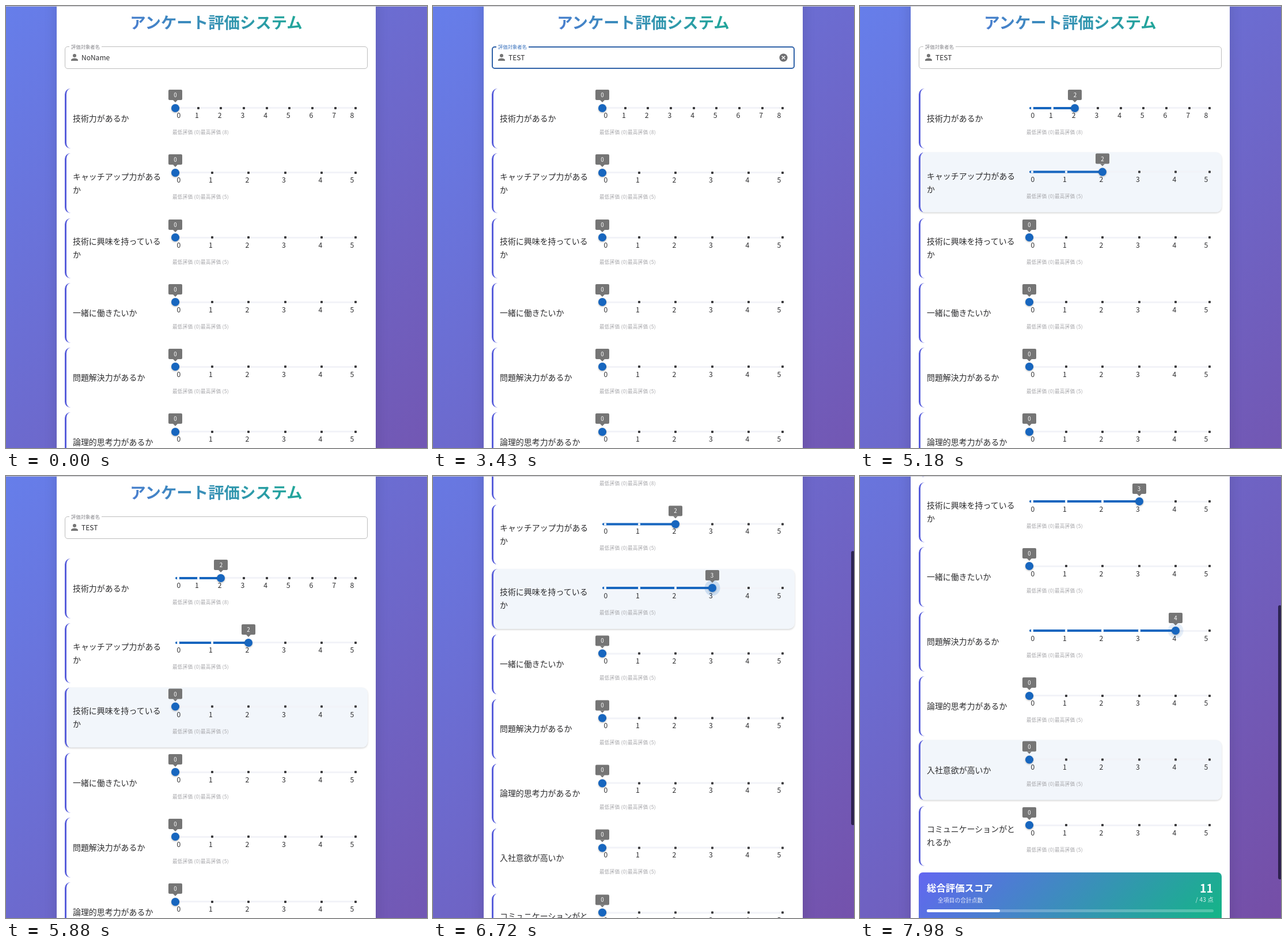
Write an HTML page that moves like this. It is 731 px wide and 766 px high and loops after 8 s.

```html
<!DOCTYPE html>
<html lang="ja">
<head>
<meta charset="utf-8">
<title>アンケート評価システム</title>
<style>
html, body { margin: 0; width: 100%; height: 100%; overflow: hidden; }
body {
  font-family: "Noto Sans CJK JP", "Noto Sans CJK", "Noto Sans", sans-serif;
  color: #2c2c2e;
}
.stage { position: relative; width: 731px; height: 766px; overflow: hidden; }
.stage div, .stage span, .stage svg { position: absolute; box-sizing: border-box; white-space: pre; }
.page {
  left: 0; top: 0; width: 731px; height: 1235px;
  background: linear-gradient(135deg, #667eea, #764ba2);
}
.panel {
  left: 88px; top: -30px; width: 554px; height: 1265px;
  background: #fff; box-shadow: 0 6px 22px rgba(0, 0, 0, .12);
}
.edge { left: 0; top: 0; width: 731px; height: 1px; background: #c7c7cd; }
.title {
  left: 102px; top: 7px; width: 526px; height: 40px;
  font: 700 27.4px/40px "Noto Sans CJK JP", "Noto Sans CJK", sans-serif; text-align: center;
  background: linear-gradient(45deg, #5a6ce6, #10b981);
  -webkit-background-clip: text; background-clip: text; color: transparent;
}

.field { left: 102px; top: 70px; width: 526px; height: 39px; border: 1px solid #bdbdbd; border-radius: 5px; }
.field.hover { border-color: #77777b; }
.field.focus { border: 2px solid #3163a8; }
.caption {
  left: 110px; top: 64px; padding: 0 3px; background: #fff;
  font-size: 8.35px; line-height: 12px; color: #85858a;
}
.caption.focus { color: #3a72bd; }
.name { left: 131px; top: 80px; font-size: 12px; line-height: 18px; }
.caret { width: 1px; height: 12px; top: 83px; background: #222; }
.person { left: 110px; top: 80px; width: 18px; height: 18px; fill: #757575; }
.clear { left: 600px; top: 81px; width: 17px; height: 17px; }

.row {
  left: 102px; width: 526px; height: 104px;
  border-left: 3px solid #595fdb; border-radius: 10px;
}
.question {
  left: 11px; top: -.7px; height: 104px; display: flex; align-items: center;
  font-size: 13.95px; line-height: 22.4px;
}
.rail, .fill { left: 189px; top: 32px; height: 3px; border-radius: 2px; background: #f2f3f8; }
.rail { width: 315px; }
.fill { top: 31.5px; height: 4px; background: #1766bf; }
.tick { top: 31.5px; width: 4px; height: 4px; margin-left: -2px; border-radius: 1px; background: #3c3c3e; }
.tick.on { background: #f4f8fd; }
.mark { top: 37px; width: 20px; margin-left: -10px; text-align: center; font-size: 12.2px; line-height: 18px; }
.range {
  left: 184px; top: 69px; font-size: 8.57px; line-height: 12px;
  letter-spacing: .0333em; color: #a6a6aa;
}
.thumb {
  top: 26.5px; width: 14px; height: 14px; margin-left: -7px;
  border-radius: 50%; background: #1766bf;
}
.bubble {
  top: 2px; width: 24px; height: 18px; margin-left: -12px; border-radius: 2px;
  background: #757575; color: #fff; text-align: center; font-size: 9.8px; font-weight: 500; line-height: 18px;
}
.bubble::after {
  content: ""; position: absolute; left: 8px; top: 18px;
  border: 4px solid transparent; border-top-color: #757575; border-bottom: 0;
}

.card {
  left: 102px; top: 1044px; width: 526px; height: 112px; border-radius: 7px; color: #fff;
  background: linear-gradient(135deg, #6366f1, #10b981);
}
.card .head { left: 14px; top: 14px; font-size: 16.4px; font-weight: 700; line-height: 24px; }
.card .sub { left: 33px; top: 41px; font-size: 9.8px; line-height: 14px; opacity: .85; }
.card .score { right: 15px; top: 13px; font-size: 19.5px; font-weight: 700; line-height: 28px; }
.card .of { right: 14px; top: 40px; font-size: 10px; line-height: 14px; opacity: .85; letter-spacing: .03em; }
.card .bar, .card .gauge { left: 14px; top: 64px; width: 498px; height: 5px; border-radius: 3px; background: rgba(255, 255, 255, .25); }
.card .gauge { background: #fff; }
.scrollbar { left: 726px; width: 6px; height: 475px; border-radius: 3px; background: rgba(22, 16, 48, .75); }
</style>
</head>
<body>
<div class="stage">
  <div class="page">
    <div class="panel"></div>
    <div class="title">アンケート評価システム</div>
    <div class="field"></div>
    <div class="caption">評価対象者名</div>
    <svg class="person" viewBox="0 0 24 24"><circle cx="12" cy="8" r="4"/><path d="M12 14c-2.7 0-8 1.3-8 4v2h16v-2c0-2.7-5.3-4-8-4"/></svg>
    <span class="name"></span>
    <div class="caret"></div>
    <svg class="clear" viewBox="0 0 24 24"><circle cx="12" cy="12" r="10" fill="#707072"/><path d="M8 8l8 8M16 8l-8 8" stroke="#fff" stroke-width="2"/></svg>
    <div class="card">
      <div class="head">総合評価スコア</div>
      <div class="sub">全項目の合計点数</div>
      <div class="score"></div>
      <div class="of">/ 43 点</div>
      <div class="bar"></div>
      <div class="gauge"></div>
    </div>
  </div>
  <div class="scrollbar"></div>
  <div class="edge"></div>
</div>
<script>
const LOOP = 8000;
const RAIL_START = 189, RAIL_LENGTH = 317.5;
const QUESTIONS = [
  '技術力があるか', 'キャッチアップ力がある\nか', '技術に興味を持っている\nか', '一緒に働きたいか',
  '問題解決力があるか', '論理的思考力があるか', '入社意欲が高いか', 'コミュニケーションがと\nれるか'
];
// row, value, time of the click
const CLICKS = [[0, 2, 4340], [1, 2, 4970], [2, 3, 6120], [4, 4, 7300]];
// row, pointer enters, pointer leaves
const HOVERS = [[0, 4200, 4730], [1, 4730, 5600], [2, 5600, 6860], [4, 6860, 7800], [6, 7800, 9000]];
// row, halo appears, halo fades
const HALOS = [[2, 6120, 6860], [4, 7300, 7920]];
const TYPING = [[0, 'NoName'], [1820, ''], [2450, 'T'], [2590, 'TE'], [2800, 'TES'], [2870, 'TEST']];
const HOVER_FIELD = 1260, FOCUS = 1820, BLUR = 4270, CARET_HALF = 525;
// start, length, distance
const SCROLLS = [[6340, 520, 249.5], [7700, 270, 107.5]];

const $ = selector => document.querySelector(selector);
const ui = Object.fromEntries(
  ['page', 'field', 'caption', 'name', 'caret', 'clear', 'score', 'gauge', 'scrollbar'].map(k => [k, $('.' + k)]));

const progress = (t, start, length) => Math.min(1, Math.max(0, (t - start) / length));
const smooth = u => u * u * (3 - 2 * u);
const show = (el, on) => { el.style.visibility = on ? 'visible' : 'hidden'; };
const setText = (el, text) => { if (el.textContent !== text) el.textContent = text; };

function add(parent, className, text = '') {
  const el = document.createElement('div');
  el.className = className;
  el.textContent = text;
  parent.append(el);
  return el;
}

function buildRow(question, index) {
  const max = index ? 5 : 8;
  const el = add(ui.page, 'row');
  el.style.top = 143.1 + index * 112.2 + 'px';
  add(el, 'question', question);
  add(el, 'rail');
  const fill = add(el, 'fill');
  const ticks = [];
  for (let i = 0; i <= max; i++) {
    const x = RAIL_START + RAIL_LENGTH * i / max;
    const tick = add(el, 'tick');
    const mark = add(el, 'mark', String(i));
    tick.style.left = x + (i === 0 ? 4.5 : i === max ? -5 : 0) + 'px';
    mark.style.left = x + (i === 0 ? 6 : i === max ? -10.5 : -2.2) + 'px';
    ticks.push(tick);
  }
  add(el, 'range', `最低評価 (0)最高評価 (${max})`);
  return { el, max, fill, ticks, thumb: add(el, 'thumb'), bubble: add(el, 'bubble') };
}
const rows = QUESTIONS.map(buildRow);

// strength of a timed state that fades in and out
function level(list, index, t, fade) {
  const span = list.find(([row]) => row === index);
  if (!span) return 0;
  return smooth(progress(t, span[1], fade)) - smooth(progress(t, span[2], fade));
}

function drawRow(row, index, t) {
  const click = CLICKS.find(([r]) => r === index);
  const value = click && t >= click[2] ? click[1] : 0;
  const shown = value && value * smooth(progress(t, click[2], 150));
  const length = RAIL_LENGTH * shown / row.max;
  const hover = level(HOVERS, index, t, 150);
  const halo = level(HALOS, index, t, 150);

  row.el.style.transform = hover ? `translateY(${-1.4 * hover}px)` : 'none';
  row.el.style.backgroundColor = `rgba(242,246,251,${hover})`;
  row.el.style.boxShadow = `0 1.5px 3px rgba(0,0,0,${.17 * hover})`;
  row.fill.style.width = length + 'px';
  row.thumb.style.left = row.bubble.style.left = RAIL_START + length + 'px';
  row.thumb.style.boxShadow =
    `0 0 0 ${6.5 * (halo > 0)}px rgba(23,102,191,${.17 * halo}), 0 1px 3px rgba(0,0,0,.3)`;
  setText(row.bubble, String(value));
  row.ticks.forEach((tick, i) => tick.classList.toggle('on', value > 0 && i <= shown));
  return value;
}

function drawField(t) {
  const [edited, text] = TYPING.filter(([time]) => time <= t).pop();
  const focused = t >= FOCUS && t < BLUR;
  ui.field.classList.toggle('hover', t >= HOVER_FIELD && t < FOCUS);
  ui.field.classList.toggle('focus', focused);
  ui.caption.classList.toggle('focus', focused);
  setText(ui.name, text);
  show(ui.clear, text && t >= HOVER_FIELD && t < BLUR);
  show(ui.caret, focused && Math.floor((t - edited) / CARET_HALF) % 2 === 0);
  ui.caret.style.left = 131 + ui.name.offsetWidth + 'px';
}

function draw(t) {
  drawField(t);
  const total = rows.reduce((sum, row, i) => sum + drawRow(row, i, t), 0);
  setText(ui.score, String(total));
  ui.gauge.style.width = 498 * total / 43 + 'px';

  const scroll = SCROLLS.reduce((y, [start, length, by]) => y + by * smooth(progress(t, start, length)), 0);
  ui.page.style.transform = `translateY(${-scroll}px)`;
  ui.scrollbar.style.top = 1.3 + scroll * .624 + 'px';
  ui.scrollbar.style.opacity =
    t < SCROLLS[0][0] ? 0 : t < SCROLLS[1][0] ? 1 - progress(t, 6880, 190) : 1;
}

const begin = performance.now();
function frame() {
  draw((performance.now() - begin) % LOOP);
  requestAnimationFrame(frame);
}
frame();
</script>
</body>
</html>
```
